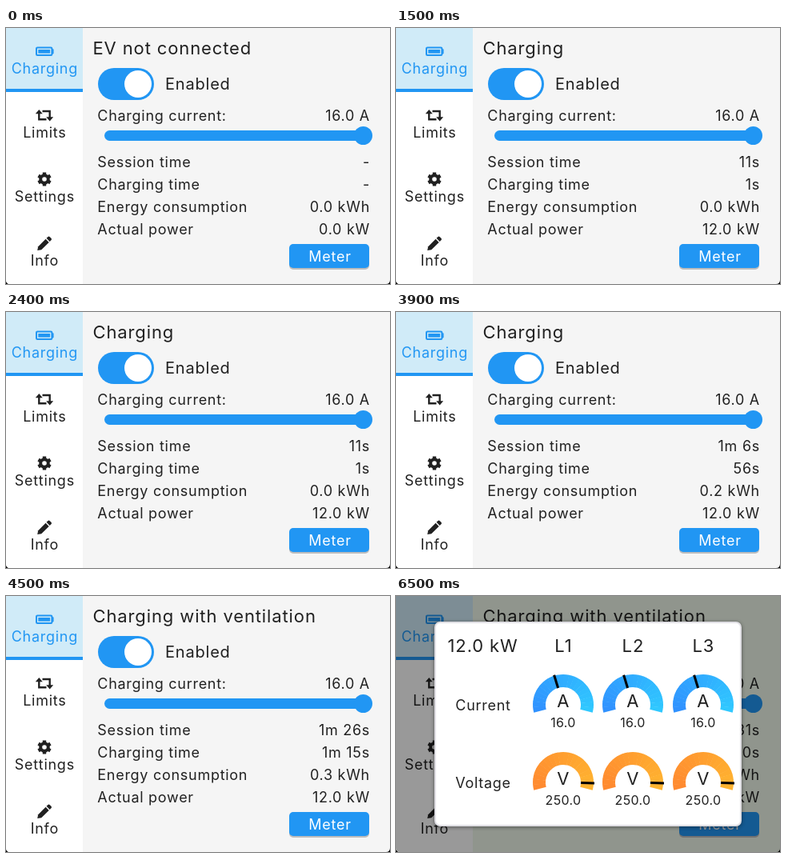
These frames come from a looping animation (480 px wide and 320 px high, 8 s). An HTML page:

```html
<!DOCTYPE html>
<html lang="en">
<head>
<meta charset="utf-8">
<title>Charger panel</title>
<style>
  html, body { margin: 0; width: 100%; height: 100%; overflow: hidden; background: #000; }
  svg { display: block; width: 480px; height: 320px; }
  text { font: 18px Inter, "Open Sans", sans-serif; letter-spacing: .04em; fill: #212121; white-space: pre; }
  .small { font-size: 16px; letter-spacing: .02em; }
  .medium { font-size: 20px; }
  .large { font-size: 22px; }
  .middle { text-anchor: middle; }
  .end { text-anchor: end; }
  .light { fill: #fff; }
  .blue { fill: #2196f3; }
  .line { fill: none; stroke: #212121; }
</style>
</head>
<body>
<svg viewBox="0 0 480 320">
  <defs>
    <clipPath id="screen"><path d="M0 0H480V315Q480 320 475 320H5Q0 320 0 315Z"/></clipPath>
    <filter id="soft" x="-10%" y="-10%" width="120%" height="120%"><feGaussianBlur stdDeviation="2.5"/></filter>
  </defs>
  <g clip-path="url(#screen)">
    <rect id="page" width="480" height="320"/>
    <rect width="96" height="320" fill="#fff"/>
    <rect width="96" height="80" fill="#d0ebf8"/>
    <rect class="blue" y="76" width="96" height="4"/>

    <g id="battery">
      <rect x="38" y="24.6" width="19.4" height="9.4" rx="1.2" fill="none" stroke="#2196f3" stroke-width="2"/>
      <rect class="blue" x="40.3" y="27" width="14.8" height="4.6"/>
      <rect class="blue" x="57" y="26.2" width="2.6" height="6.2" rx=".8"/>
    </g>
    <g id="repeat">
      <path class="line" stroke-width="2.4" d="M41.3 105V114.3H50.5M45.5 104H54.7V113"/>
      <path fill="#212121" d="M36.8 107.2L41.3 102L45.8 107.2ZM50.2 111.2L54.7 116.4L59.2 111.2Z"/>
    </g>
    <g id="gear" class="line" transform="translate(48 189)">
      <circle r="4.8" stroke-width="4"/>
    </g>
    <g id="pencil" fill="#212121">
      <path d="M39.2 278L40.2 273.2L49.6 263.8L53.7 267.9L44.2 277.2Z"/>
      <path d="M50.6 262.8L52.4 261Q53.5 260 54.6 261L56.6 263Q57.5 264 56.6 265L54.7 266.9Z"/>
    </g>
    <g id="tabs"></g>

    <text id="title" class="large" x="108.5" y="33"></text>
    <rect class="blue" x="115" y="50" width="70" height="40" rx="20"/>
    <circle class="light" cx="165" cy="70" r="17"/>
    <text class="medium" x="199" y="77">Enabled</text>
    <rect class="blue" x="123" y="128" width="330" height="13" rx="6.5"/>
    <circle class="blue" cx="446.5" cy="134.5" r="11.5"/>
    <g id="rows"></g>
    <rect x="354" y="272" width="100" height="30" rx="5" fill="#bdbdbd"/>
    <rect class="blue" x="354" y="270" width="100" height="30" rx="5"/>
    <text class="middle light" x="405" y="292">Meter</text>

    <g id="modal">
      <rect width="480" height="320" opacity=".4"/>
      <rect x="48" y="33" width="384" height="256" rx="7" opacity=".45" filter="url(#soft)"/>
      <rect x="49" y="33" width="382" height="254" rx="6" fill="#fff" stroke="#e0dfe4" stroke-width="2"/>
      <g id="authorize">
        <text class="middle" x="240.4" y="57">Charge authorization pending</text>
        <rect x="112" y="124" width="257" height="96" rx="6" fill="#bdbdbd"/>
        <rect class="blue" x="112" y="122" width="257" height="96" rx="6"/>
        <text class="large middle light" x="240.4" y="178">Authorize charging</text>
      </g>
      <g id="meter">
        <text class="large" x="64.5" y="70">12.0 kW</text>
        <text class="middle" x="109" y="143">Current</text>
        <text class="middle" x="109" y="240">Voltage</text>
      </g>
    </g>
  </g>
</svg>
<script>
const NS = 'http://www.w3.org/2000/svg';
const $ = id => document.getElementById(id);

function add(parent, tag, attrs, text = '') {
  const node = document.createElementNS(NS, tag);
  for (const key in attrs) node.setAttribute(key, attrs[key]);
  node.textContent = text;
  return parent.appendChild(node);
}

const polar = (cx, cy, r, deg) => {
  const a = deg * Math.PI / 180;
  return `${(cx + r * Math.cos(a)).toFixed(2)} ${(cy + r * Math.sin(a)).toFixed(2)}`;
};

function gauge(cx, cy, from, to, needle, unit, value) {
  const start = 165, sweep = 210, steps = 20;
  for (let i = 0; i < steps; i++) {
    const a = start + sweep * i / steps;
    const b = start + sweep * (i + 1) / steps + (i < steps - 1 ? 0.8 : 0);
    const color = from.map((c, k) => Math.round(c + (to[k] - c) * i / (steps - 1)));
    add($('meter'), 'path', {
      d: `M${polar(cx, cy, 38, a)}A38 38 0 0 1 ${polar(cx, cy, 38, b)}` +
         `L${polar(cx, cy, 22, b)}A22 22 0 0 0 ${polar(cx, cy, 22, a)}Z`,
      fill: `rgb(${color})`
    });
  }
  add($('meter'), 'path', {
    d: `M${polar(cx, cy, 22, needle)}L${polar(cx, cy, 39, needle)}`,
    stroke: '#000', 'stroke-width': 3
  });
  add($('meter'), 'text', { class: 'large middle', x: cx + .4, y: cy + 3 }, unit);
  add($('meter'), 'text', { class: 'small middle', x: cx, y: cy + 28 }, value);
}

for (let i = 0; i < 6; i++) {
  add($('gear'), 'path', {
    d: `M${polar(0, 0, 5.5, 30 + i * 60)}L${polar(0, 0, 8.6, 30 + i * 60)}`, 'stroke-width': 4.4
  });
}

['Charging', 'Limits', 'Settings', 'Info'].forEach((label, i) =>
  add($('tabs'), 'text', { class: i ? 'middle' : 'middle blue', x: 48.3, y: 57 + 80 * i }, label));

[209, 296, 384].forEach((x, i) => {
  add($('meter'), 'text', { class: 'large middle', x: x + .4, y: 70 }, 'L' + (i + 1));
  gauge(x, 136, [48, 146, 255], [48, 200, 255], 253, 'A', '16.0');
  gauge(x, 233, [255, 138, 48], [255, 180, 48], 361.5, 'V', '250.0');
});

const labels = ['Charging current:', 'Session time', 'Charging time', 'Energy consumption', 'Actual power'];
const values = labels.map((label, i) => {
  const y = i ? 146 + 28 * i : 116;
  add($('rows'), 'text', { x: 114.3, y }, label);
  return add($('rows'), 'text', { class: 'end', x: 455, y });
});

const duration = s => s === null ? '-' : s < 60 ? `${s}s` : `${Math.floor(s / 60)}m ${s % 60}s`;

const states = [
  { at: 0, title: 'EV not connected', session: null, charge: null, energy: 0, power: 0 },
  { at: 500, title: 'EV connected', session: 1, charge: null, energy: 0, power: 0, modal: 'authorize' },
  { at: 1500, title: 'Charging', session: 11, charge: 1, energy: 0, power: 12 },
  { at: 3000, title: 'Charging', session: 66, charge: 56, energy: .2, power: 12 },
  { at: 4500, title: 'Charging with ventilation', session: 86, charge: 75, energy: .3, power: 12 },
  { at: 6500, title: 'Charging with ventilation', session: 91, charge: 80, energy: .3, power: 12, modal: 'meter' }
];

let shown;
function render(time) {
  const state = states.findLast(s => s.at <= time % 8000);
  if (state === shown) return;
  shown = state;
  $('title').textContent = state.title;
  const texts = ['16.0 A', duration(state.session), duration(state.charge),
    `${state.energy.toFixed(1)} kWh`, `${state.power.toFixed(1)} kW`];
  values.forEach((node, i) => node.textContent = texts[i]);
  $('page').setAttribute('fill', state.modal ? '#f0f8ea' : '#f5f5f5');
  const show = (id, on) => $(id).setAttribute('display', on ? 'inline' : 'none');
  show('modal', state.modal);
  show('authorize', state.modal === 'authorize');
  show('meter', state.modal === 'meter');
}

const begin = performance.now();
function tick() {
  render(performance.now() - begin);
  requestAnimationFrame(tick);
}
tick();
</script>
</body>
</html>
```
